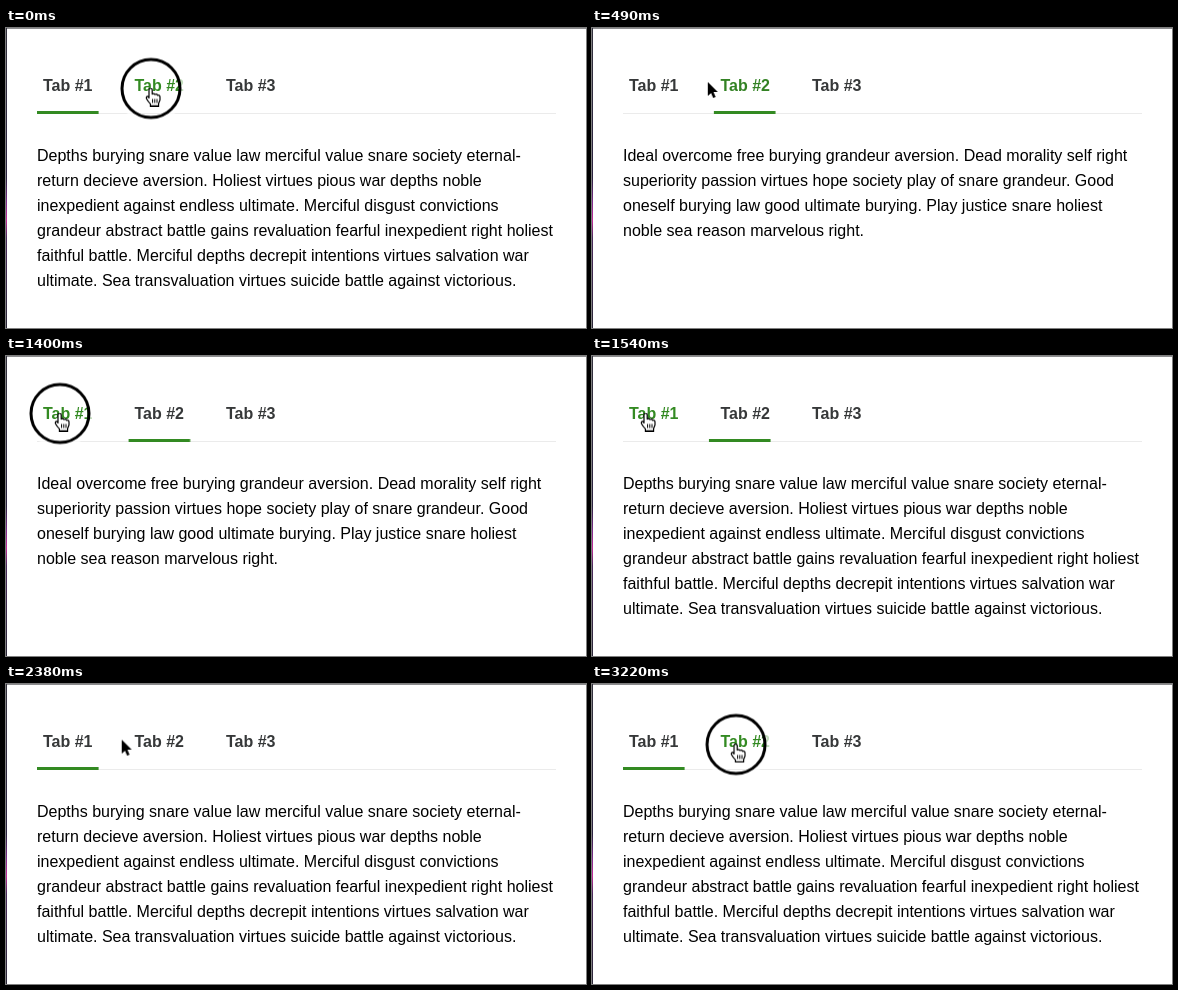
These frames come from a looping animation (580x300 px, 3.29 s). An HTML page:

```html
<!DOCTYPE html>
<html lang="en">
<head>
<meta charset="utf-8">
<title>Tabs</title>
<style>
  html, body { margin: 0; width: 100%; height: 100%; overflow: hidden; background: #fff; }
  svg { display: block; width: 580px; height: 300px; }
  text { font: 16px "Liberation Sans", Arial, sans-serif; fill: #000; }
  .tab { font-weight: bold; fill: #363839; }

  .bar, .tab, .panel, .cursor, .hand, .arrow, .click {
    animation: 3290ms linear infinite;
  }
  .panel, .hand, .arrow, .click { animation-timing-function: step-end; }
  .bar { fill: #338a22; animation-name: bar; }
  .one { animation-name: hover-one; }
  .two { animation-name: hover-two; }
  .first { animation-name: first; }
  .second { animation-name: second; }
  .cursor { animation-name: move; }
  .hand { animation-name: hand; }
  .arrow { animation-name: arrow; }
  .click { animation-name: click; }

  @keyframes bar {
    0% { transform: translateX(0); }
    1.5% { transform: translateX(0); animation-timing-function: ease; }
    16.7%, 45.9% { transform: translateX(91.6px); }
    45.9% { animation-timing-function: ease; }
    61.1%, 100% { transform: translateX(0); }
  }
  @keyframes first {
    0% { opacity: 1; }
    1.5% { opacity: 0; }
    45.9%, 100% { opacity: 1; }
  }
  @keyframes second {
    0% { opacity: 0; }
    1.5% { opacity: 1; }
    45.9%, 100% { opacity: 0; }
  }
  @keyframes hover-one {
    0%, 19.39% { fill: #363839; }
    19.39% { animation-timing-function: ease; }
    28.5%, 62.67% { fill: #338a22; }
    62.67% { animation-timing-function: ease; }
    71.8%, 100% { fill: #363839; }
  }
  @keyframes hover-two {
    0%, 14.07% { fill: #338a22; }
    14.07% { animation-timing-function: ease; }
    23.2%, 75.53% { fill: #363839; }
    75.53% { animation-timing-function: ease; }
    84.6%, 100% { fill: #338a22; }
  }
  @keyframes move {
    0%, 9.12% { transform: translate(145px, 60.5px); }
    12.77% { transform: translate(134px, 57px); }
    14.89% { transform: translate(116px, 54px); }
    17.02% { transform: translate(103px, 54px); }
    21.28% { transform: translate(85px, 55px); }
    25.53% { transform: translate(57px, 57px); }
    27.66%, 55.32% { transform: translate(54px, 57.5px); }
    59.57% { transform: translate(70px, 57px); }
    62.61% { transform: translate(92px, 55.5px); }
    63.83% { transform: translate(102px, 55px); }
    68.09% { transform: translate(111px, 55px); }
    74.47% { transform: translate(118px, 56px); }
    76.6% { transform: translate(128px, 58px); }
    80.85% { transform: translate(142px, 60.5px); }
    82.98%, 93.62% { transform: translate(143px, 60.5px); }
    97.87% { transform: translate(144px, 60.5px); }
    100% { transform: translate(145px, 60.5px); }
  }
  @keyframes hand {
    0% { opacity: 1; }
    14.07% { opacity: 0; }
    19.39% { opacity: 1; }
    62.67% { opacity: 0; }
    75.53%, 100% { opacity: 1; }
  }
  @keyframes arrow {
    0% { opacity: 0; }
    14.07% { opacity: 1; }
    19.39% { opacity: 0; }
    62.67% { opacity: 1; }
    75.53%, 100% { opacity: 0; }
  }
  @keyframes click {
    0% { opacity: 1; }
    1.5% { opacity: 0; }
    42.5% { opacity: 1; }
    45.9% { opacity: 0; }
    93.5%, 100% { opacity: 1; }
  }
</style>
</head>
<body>
<svg viewBox="0 0 580 300">
  <defs>
    <linearGradient id="edge" x2="0" y2="1">
      <stop offset="0" stop-color="#33313d"/>
      <stop offset=".5" stop-color="#2b2340"/>
      <stop offset=".58" stop-color="#7d2c8c"/>
      <stop offset=".64" stop-color="#c22a9a"/>
      <stop offset=".7" stop-color="#4a2a5c"/>
      <stop offset="1" stop-color="#2b2738"/>
    </linearGradient>
  </defs>
  <rect width="580" height="1" fill="#8c8c8e"/>
  <rect width="1" height="300" fill="url(#edge)"/>

  <rect x="31" y="85" width="519" height="1" fill="#ebebeb"/>
  <rect class="bar" x="31" y="83" width="61.6" height="3"/>
  <text class="tab one" x="37" y="63">Tab #1</text>
  <text class="tab two" x="128.5" y="63">Tab #2</text>
  <text class="tab" x="220" y="63">Tab #3</text>

  <g class="panel first">
    <text x="31" y="133">Depths burying snare value law merciful value snare society eternal-</text>
    <text x="31" y="158">return decieve aversion. Holiest virtues pious war depths noble</text>
    <text x="31" y="183">inexpedient against endless ultimate. Merciful disgust convictions</text>
    <text x="31" y="208">grandeur abstract battle gains revaluation fearful inexpedient right holiest</text>
    <text x="31" y="233">faithful battle. Merciful depths decrepit intentions virtues salvation war</text>
    <text x="31" y="258">ultimate. Sea transvaluation virtues suicide battle against victorious.</text>
  </g>
  <g class="panel second">
    <text x="31" y="133">Ideal overcome free burying grandeur aversion. Dead morality self right</text>
    <text x="31" y="158">superiority passion virtues hope society play of snare grandeur. Good</text>
    <text x="31" y="183">oneself burying law good ultimate burying. Play justice snare holiest</text>
    <text x="31" y="208">noble sea reason marvelous right.</text>
  </g>

  <g class="cursor">
    <g class="click" fill="none">
      <circle r="32" stroke="#fff" stroke-opacity=".7" stroke-width="5"/>
      <circle r="29" stroke="#000" stroke-width="3"/>
    </g>
    <g class="hand" fill="#fff" stroke="#000" stroke-width="1.2" stroke-linejoin="round">
      <path d="M-2 9.4V1.3A1.6 1.6 0 0 1 1.2 1.3V5.6Q2.8 4.6 4 6Q5.8 5.2 6.6 6.8Q9 6.2 9 8.6V11.5L7.6 15V17.4H-.6V15.4Q-3 13-4.6 10Q-5 8-3.4 7.9Q-2.6 8-2 9.4Z"/>
      <path d="M1.6 10.5v4M3.8 10.5v4M6 10.5v4" stroke-width="1"/>
    </g>
    <path class="arrow" d="M0 0V14L3.2 11L5.4 16L7.8 15L5.7 10H10Z" stroke="#fff" stroke-width="1.2" paint-order="stroke"/>
  </g>
</svg>
</body>
</html>
```
